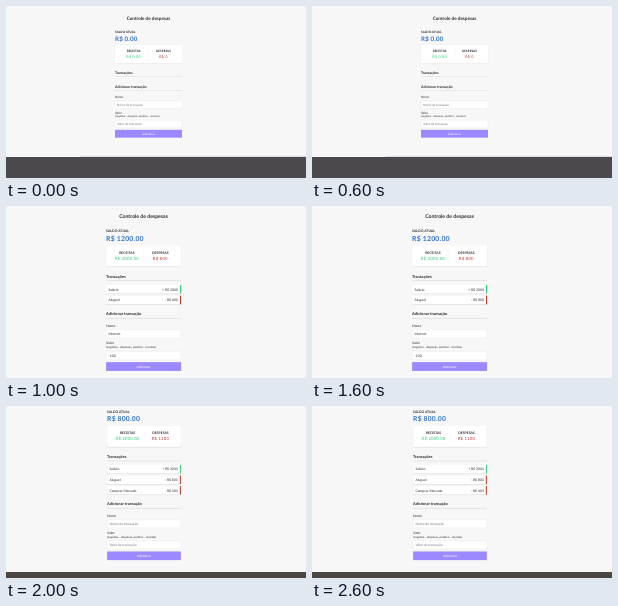
These frames come from a looping animation (300 px wide and 172 px high, 3000 ms). An HTML page:

```html
<!DOCTYPE html>
<html lang="pt-BR">
<head>
<meta charset="utf-8">
<title>Controle de despesas</title>
<style>
html, body { margin: 0; width: 100%; height: 100%; overflow: hidden; background: #f7f7f7; }
svg { display: block; width: 100%; height: 100%; }
text { font-family: Lato, sans-serif; white-space: pre; text-rendering: geometricPrecision; }
</style>
</head>
<body>
<svg id="stage" viewBox="0 0 300 172"></svg>
<script>
const stage = document.getElementById('stage');
const INK = '#2b2b2b', GREEN = '#2ecc71', RED = '#c0392b', HINT = '#777';
const HOLD = 1000;

const salary = ['Salário', '+ R$ 2000', GREEN];
const rent = ['Aluguel', '- R$ 800', RED];
const food = ['Compras Mercado', '- R$ 400', RED];

// x, y place the "SALDO ATUAL" label; width is the column on stage
const views = [
  { x: 109, y: 26, width: 67, total: '0.00', income: '0.00', spent: '0', items: [],
    band: 151, bandFill: '#4b494d', edge: true },
  { x: 100.1, y: 25.2, width: 75, total: '1200.00', income: '2000.00', spent: '800',
    items: [salary, rent], name: 'Internet', value: '-100' },
  { x: 101.1, y: 6.1, width: 73.8, total: '800.00', income: '2000.00', spent: '1200',
    items: [salary, rent, food], band: 166, bandFill: '#4c4643' }
];

const rect = (x, y, w, h, fill, more = '') =>
  `<rect x="${x}" y="${y}" width="${w}" height="${h}" fill="${fill}" ${more}/>`;

// y is the middle of the capitals
function text(str, x, y, size, { bold, anchor = 'start', fill = INK, gap = 0 } = {}) {
  return `<text x="${x}" y="${y + size * 0.36}" font-size="${size}" text-anchor="${anchor}"
    font-weight="${bold ? 700 : 400}" letter-spacing="${gap}" fill="${fill}">${str}</text>`;
}

const card = (y, h) =>
  rect(-1, y, 352, h + 3, '#000', 'opacity=".07"') +
  rect(0, y + 1, 350, h + 1, '#000', 'opacity=".07"') +
  rect(0, y, 350, h, '#fff');

const heading = (str, y) =>
  text(str, 0, y, 18.72, { bold: true }) + rect(0, y + 19, 350, 1.5, '#bbb');

const field = (y, value, hint) =>
  rect(0.5, y, 349, 39, '#fff', 'stroke="#dedede" stroke-width="1.5" rx="2"') +
  text(value || hint, 11, y + 20, 16, { fill: value ? INK : HINT });

function summary(v) {
  const column = (label, amount, x, fill) =>
    text(label, x, 100, 16, { bold: true, anchor: 'middle' }) +
    text('R$ ' + amount, x, 127, 20, { anchor: 'middle', fill, gap: 1 });
  return card(65, 100) + rect(174.5, 85, 1, 60, '#dedede') +
    column('RECEITAS', v.income, 97, GREEN) +
    column('DESPESAS', v.spent, 253, RED);
}

function item([name, amount, color], i) {
  const y = 251 + i * 50;
  return card(y, 40) + rect(345, y, 5, 40, color) +
    text(name, 11, y + 20, 16) +
    text(amount, 335, y + 20, 16, { anchor: 'end' });
}

function form(v) {
  const y = 289 + v.items.length * 50;
  return heading('Adicionar transação', y - 3) +
    text('Nome', 0, y + 51, 16) +
    field(y + 71, v.name, 'Nome da transação') +
    text('Valor', 0, y + 133, 16) +
    text('(negativo - despesas, positivo - receitas)', 0, y + 152, 13.33) +
    field(y + 172, v.value, 'Valor da transação') +
    rect(0, y + 222, 350, 41, '#9c88ff') +
    text('Adicionar', 175, y + 242, 16, { anchor: 'middle', fill: '#fff' });
}

function page(v) {
  let out = rect(0, 0, 300, 172, '#f7f7f7');
  out += `<g transform="translate(${v.x} ${v.y}) scale(${v.width / 350})">` +
    text('Controle de despesas', 175, -72, 24, { bold: true, anchor: 'middle' }) +
    text('SALDO ATUAL', 0, 0, 16, { bold: true }) +
    text('R$ ' + v.total, 0, 33, 32, { bold: true, fill: '#2b72d0', gap: 1 }) +
    summary(v) + heading('Transações', 212) +
    v.items.map(item).join('') + form(v) + '</g>';
  if (v.edge) out += rect(74, v.band - 1, 226, 1, '#dcdcdc');
  if (v.band) out += rect(0, v.band, 300, 172 - v.band, v.bandFill);
  return out;
}

let shown = -1;
function draw(ms) {
  const index = Math.floor(ms / HOLD) % views.length;
  if (index !== shown) {
    stage.innerHTML = page(views[index]);
    shown = index;
  }
}

const start = performance.now();
function tick() {
  draw(performance.now() - start);
  requestAnimationFrame(tick);
}
tick();
</script>
</body>
</html>
```
